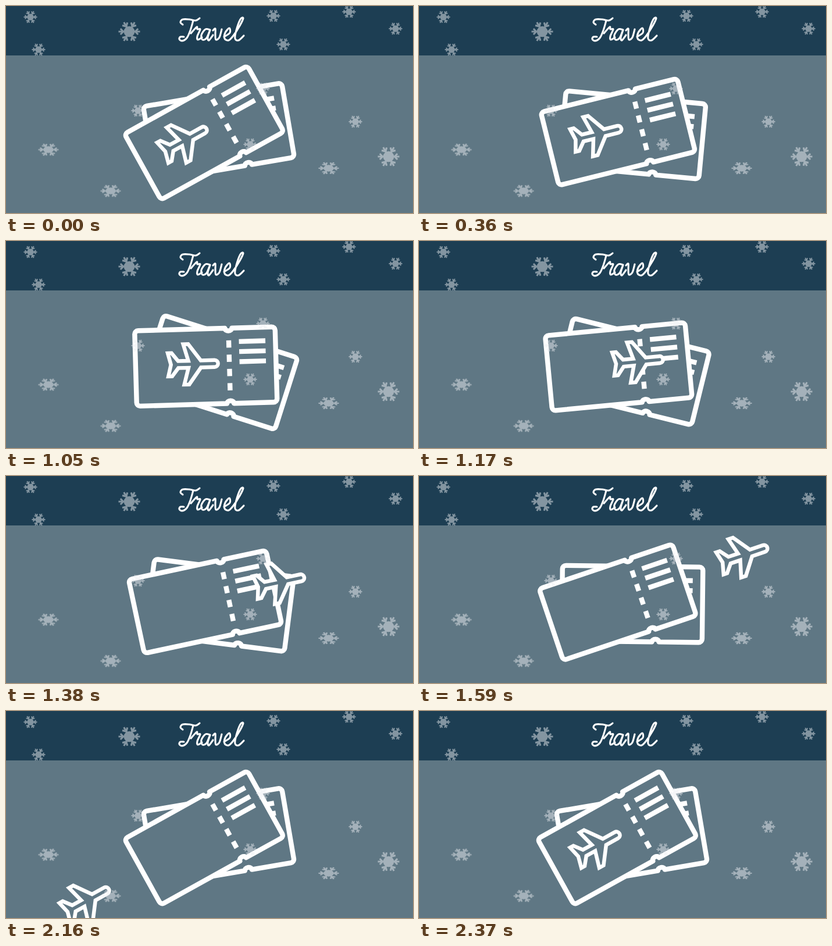
Animation, 700 px wide and 356 px high, one loop 2700 ms. Source, as an HTML page:

```html
<!DOCTYPE html>
<html lang="en">
<head>
<meta charset="utf-8">
<title>Travel</title>
<style>
  html, body { margin: 0; width: 100%; height: 100%; overflow: hidden; background: #5f7784; }
  svg { display: block; width: 100vw; height: 100vh; }
  .line { fill: none; stroke: #fff; }
  .solid { fill: #5f7784; stroke: #fff; }
  .lettering { stroke-width: 3.1; stroke-linecap: round; stroke-linejoin: round; }
</style>
</head>
<body>
<svg viewBox="0 0 700 356">
  <defs>
    <g id="ticket" stroke-width="8.4">
      <path id="outline" class="solid" stroke-linejoin="round"/>
      <path class="line" stroke-dasharray="12.4 12.1" d="M40.5-43.7V43"/>
      <path class="line" d="M58-41.3h45.5m-45.5 17.3h45.5m-45.5 17.3h45.5"/>
    </g>
    <path id="arm" d="M0 0H1M.55 0l.27.27M.55 0l.27-.27"/>
    <g id="flake" stroke="#ebedf0" stroke-width=".17"></g>
  </defs>

  <rect width="700" height="356" fill="#5f7784"/>

  <g id="tickets">
    <use href="#ticket" transform="rotate(-9.7 347 223) translate(366.8 219.8)"/>
    <g transform="rotate(-29 347 223) translate(344 215.7)">
      <use href="#ticket"/>
      <path id="plane" class="solid" stroke-width="6.5"/>
    </g>
  </g>

  <rect width="700" height="85" fill="#1d3e53"/>
  <g id="title" class="line lettering" role="img" aria-label="Travel"></g>
  <g id="snow" opacity=".5"></g>
</svg>
<script>
  const byId = id => document.getElementById(id);
  const progress = (t, start, end) => Math.min(1, Math.max(0, (t - start) / (end - start)));

  // Rounded ticket with a small notch above and below the perforation
  function ticketOutline(w, h, corner, notchX, notch) {
    const round = (dx, dy) => `a${corner} ${corner} 0 0 1 ${dx * corner} ${dy * corner}`;
    const dent = dx => `a${notch} 4.6 0 0 0 ${dx * 2 * notch} 0`;
    const x = w - corner, y = h - corner;
    return `M${-x} ${-h}H${notchX - notch}${dent(1)}H${x}${round(1, 1)}V${y}${round(-1, 1)}`
      + `H${notchX + notch}${dent(-1)}H${-x}${round(-1, -1)}V${-y}${round(1, -1)}z`;
  }

  // Lower half from tail to nose; the upper half is its mirror image
  function planeOutline() {
    const body = 6, wing = 34.7, tail = 20;
    const half = [[-74, 0], [-79, tail], [-72.5, tail], [-61.5, body], [-44, body],
      [-52, wing], [-43.5, wing], [-22.5, body], [1, body]];
    const mirrored = half.map(([x, y]) => [x, -y]).reverse();
    return `M${half.join('L')}A${body} ${body} 0 0 0 ${mirrored.join('L')}z`;
  }

  // Smooth curve through a few points "x,y x,y ..."
  function spline(text) {
    const points = text.split(' ').map(pair => pair.split(',').map(Number));
    const at = i => points[Math.min(points.length - 1, Math.max(0, i))];
    const handle = (i, sign) => at(i).map((v, k) => v + sign * (at(i + 1)[k] - at(i - 1)[k]) / 6);
    const curves = points.slice(1).map((p, i) => `C${handle(i, 1)} ${handle(i + 1, -1)} ${p}`);
    return `<path d="M${points[0]}${curves.join('')}"/>`;
  }

  const strokes = [
    '304,32 300,28 304,23 315,23 326,25 333,21',              // T bar
    '322,25 317,42 311,55 303,60 298,57 300,53 306,53',       // T stem
    '318,47 328,36 329,40 334,40 329,52 330,58 337,54',       // r
    '351,41 343,40 336,50 338,58 345,55 351,41 347,54 349,59 356,50', // a
    '356,42 360,39 360,50 361,58 367,54 371,40',              // v
    '375,53 385,46 384,38 377,46 376,56 383,59 391,51 402,34 408,21 403,23 396,42 394,56 400,59 409,51' // e, l
  ];

  const snow = [
    { size: 11.5, squash: 1, at: '42,19 56,75 460,17 477,66 590,10 670,39 227,180 442,142 420,238 601,199' },
    { size: 18.5, squash: 1, at: '212,44 658,259' },
    { size: 17.5, squash: .66, at: '73,247 555,279 180,318' }
  ];

  byId('outline').setAttribute('d', ticketOutline(120.8, 64.8, 6, 40.5, 6));
  byId('plane').setAttribute('d', planeOutline());
  byId('title').innerHTML = strokes.map(spline).join('');

  let flake = '<circle r=".42" fill="#ebedf0"/>';
  for (let angle = 0; angle < 360; angle += 60) flake += `<use href="#arm" transform="rotate(${angle})"/>`;
  byId('flake').innerHTML = flake;
  byId('snow').innerHTML = snow.map(({ size, squash, at }) => at.split(' ').map(point =>
    `<use href="#flake" transform="translate(${point}) scale(${size} ${size * squash})"/>`).join('')).join('');

  const LOOP = 2700, STEP = 30, SWING = 28.3;

  function planeOffset(t) {
    if (t < 2010) return 0.468 * Math.max(0, t - 1020);   // fly off to the upper right
    return -0.92 * Math.max(0, 2370 - t);                 // come back from the lower left
  }

  function draw(now) {
    const t = Math.floor(now % LOOP / STEP) * STEP;
    const angle = SWING * (progress(t, 120, 570) - progress(t, 1020, 1920));
    byId('tickets').setAttribute('transform', `rotate(${angle} 347 223)`);
    const dx = planeOffset(t);
    byId('plane').setAttribute('transform', `translate(${dx} ${-4.5 - 0.01 * dx})`);
  }

  const begin = performance.now();
  function tick() {
    draw(performance.now() - begin);
    requestAnimationFrame(tick);
  }
  tick();
</script>
</body>
</html>
```
